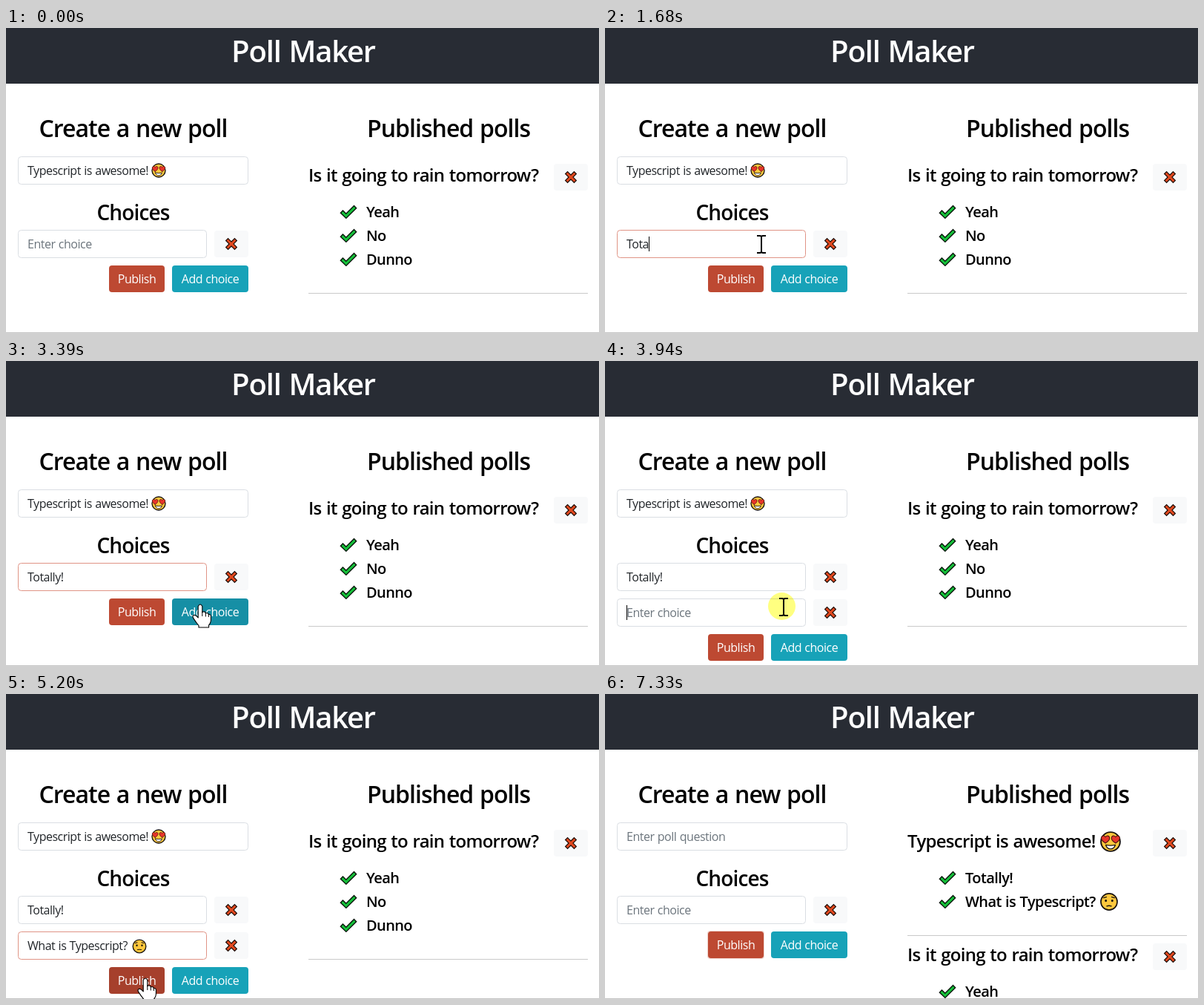
Animation of 800x411 px, one loop 7.37 s. Source, as an HTML page with a canvas:

```html
<!DOCTYPE html>
<html lang="en">
<head>
<meta charset="utf-8">
<title>Poll Maker</title>
<style>
  html, body { margin: 0; width: 100%; height: 100%; overflow: hidden; background: #fff; }
  canvas { display: block; }
</style>
</head>
<body>
<canvas width="800" height="411"></canvas>
<script>
const ctx = document.querySelector('canvas').getContext('2d');
const LOOP = 7370;
const ADDED = 3550, PASTED = 4500, PUBLISHED = 5735;
const KEY_TIMES = [1130, 1450, 1530, 1680, 1910, 1990, 2230, 2460];
const CLICKS = [[680, 800], [3470, 3630], [3870, 4020], [5660, 5735]];

// The pointer is redrawn in bursts: start, end, number of steps.
const BURSTS = [
  [130, 840, 10], [3010, 3240, 4], [3390, 3710, 5], [3870, 4090, 4],
  [4500, 5200, 10], [5660, 5890, 4], [6210, 6360, 3]
];
// Pointer positions: time, x, y.
const PATH = [
  [130, 392, 362], [610, 211, 291], [2935, 211, 291], [3240, 262, 319],
  [3390, 262, 328], [3550, 262, 328], [3710, 241, 331], [4500, 241, 331],
  [5200, 188, 383], [6135, 188, 383], [6210, 240, 390], [6285, 292, 397]
];

const between = (t, a, b) => t >= a && t < b;
const clamp = v => Math.max(0, Math.min(1, v));
const smooth = v => v * v * (3 - 2 * v);
const fade = (t, a, b) => clamp((t - a) / 150) * (1 - clamp((t - b) / 150));
const mix = (a, b, p) => `rgb(${a.map((v, i) => Math.round(v + (b[i] - v) * p))})`;

function text(str, x, y, size, { weight = 400, color = '#000', align = 'left' } = {}) {
  ctx.font = `${weight} ${size}px "Open Sans", "Noto Sans", sans-serif`;
  ctx.letterSpacing = `${-0.03 * size}px`;
  ctx.wordSpacing = `${0.04 * size}px`;
  ctx.textAlign = align;
  ctx.fillStyle = color;
  ctx.fillText(str, x, y);
  return ctx.measureText(str).width;
}

const heading = (str, x, y, size, align = 'center', color = '#000') =>
  text(str, x, y, size, { weight: 600, align, color });

function box(x, y, w, h, fill, stroke) {
  ctx.beginPath();
  const inset = stroke ? 0.5 : 0;
  ctx.roundRect(x + inset, y + inset, w - 2 * inset, h - 2 * inset, 4);
  if (fill) { ctx.fillStyle = fill; ctx.fill(); }
  if (stroke) { ctx.strokeStyle = stroke; ctx.lineWidth = 1; ctx.stroke(); }
}

// Paints a path around a local origin, fill first, then each stroke.
function shape(x, y, d, { scale = 1, fill, strokes = [], cap = 'butt' }) {
  const path = new Path2D(d);
  ctx.save();
  ctx.translate(x, y);
  ctx.scale(scale, scale);
  ctx.lineCap = cap;
  ctx.lineJoin = cap === 'round' ? 'round' : 'miter';
  if (fill) { ctx.fillStyle = fill; ctx.fill(path); }
  for (const [color, width] of strokes) {
    ctx.strokeStyle = color;
    ctx.lineWidth = width;
    ctx.stroke(path);
  }
  ctx.restore();
}

function removeButton(x, y) {
  box(x, y, 46, 36, '#f8f9fa');
  shape(x + 23, y + 18, 'M-4.4-4.4L4.4 4.4M4.4-4.4L-4.4 4.4',
    { strokes: [['#1a0d08', 5.4], ['#e2491f', 3]], cap: 'square' });
}

function check(x, y) {
  shape(x, y, 'M-7.5 1.2L-3.2 5.3L7.5-5.3',
    { strokes: [['#08140a', 5.8], ['#16c03a', 3]], cap: 'square' });
}

function emoji(x, y, r, mood) {
  const scale = r / 10;
  const draw = (d, fill, width = 1, color = '#1b1510') =>
    shape(x, y, d, { scale, fill, strokes: [[color, width]], cap: 'round' });
  draw('M-9.2 0A9.2 9.2 0 1 1 9.2 0A9.2 9.2 0 1 1-9.2 0Z', '#ffc83d', 1.4);
  if (mood === 'love') {
    for (const side of [-4.9, 4.9]) {
      const heart = `M${side} 1.4C${side - 7}-2.6 ${side - 3.2}-8 ${side}-4.6C${side + 3.2}-8 ${side + 7}-2.6 ${side} 1.4Z`;
      draw(heart, '#e8352a', 0.8, '#4a1510');
    }
    draw('M-4.6 3.2Q0 4.2 4.6 3.2Q3.4 7 0 7Q-3.4 7-4.6 3.2Z', '#fff', 0.9);
  } else {
    draw('M-3.6-1.4V-1M3.6-1.4V-1', null, 2.4);
    draw('M-6-4.4L-3-5.4M6-4.4L3-5.4M-2.6 4.8Q0 3.9 2.6 4.8', null, 1.1);
  }
}

function field(y, w, value, placeholder, focus = 0) {
  box(16, y, w, 38, '#fff', mix([218, 222, 227], [224, 148, 134], focus));
  return 29 + (value
    ? text(value, 29, y + 25, 16, { color: '#212529' })
    : (text(placeholder, 29, y + 25, 16, { color: '#6c757d' }), 0));
}

function caret(x, y) {
  ctx.fillStyle = '#000';
  ctx.fillRect(Math.round(x), y + 9, 1, 20);
}

function button(label, x, y, w, color) {
  box(x, y, w, 36, color);
  text(label, x + w / 2, y + 24, 16, { color: '#fff', align: 'center' });
}

// Draws one published poll and returns the top of the next.
function poll(top, question, choices, extras) {
  heading(question, 408, top + 24, 24, 'left');
  removeButton(739, top);
  choices.forEach((choice, i) => {
    check(462, top + 65 + 32 * i);
    heading(choice, 486, top + 72 + 32 * i, 20, 'left');
  });
  if (extras) extras();
  const end = top + 78 + 32 * choices.length;
  ctx.fillStyle = '#c9c9c9';
  ctx.fillRect(408, end, 377, 1);
  return end + 11;
}

function pointerAt(t) {
  if (t < 130 || t >= 6360) return null;
  const [start, end, steps] = BURSTS.findLast(burst => t >= burst[0]);
  const gap = (end - start) / (steps - 1);
  const time = start + gap * Math.min(steps - 1, Math.floor((t - start) / gap + 1e-6));
  const i = PATH.findLastIndex(stop => time >= stop[0]);
  const [t0, x0, y0] = PATH[i];
  const [t1, x1, y1] = PATH[i + 1] || [t0 + 1, x0, y0];
  const p = smooth(clamp((time - t0) / (t1 - t0)));
  return { x: x0 + (x1 - x0) * p, y: y0 + (y1 - y0) * p };
}

function targetUnder(pointer, rows, buttonTop) {
  if (!pointer) return null;
  const { x, y } = pointer;
  const inside = (l, t, w, h) => x >= l && x <= l + w && y >= t && y <= t + h;
  if (inside(139, buttonTop, 75, 36)) return 'publish';
  if (inside(224, buttonTop, 103, 36)) return 'add';
  for (let i = 0; i < rows; i++) {
    if (inside(16, 272 + 48 * i, 255, 38)) return 'field';
    if (inside(281, 273 + 48 * i, 46, 36)) return 'remove';
  }
  return null;
}

function drawPointer({ x, y }, target) {
  if (target === 'field') {
    shape(x, y, 'M-6-11H-2Q0-11 0-9Q0-11 2-11H6M0-9V10M-6 12H-2Q0 12 0 10Q0 12 2 12H6',
      { strokes: [['#000', 2]] });
  } else if (target) {
    shape(x, y, 'M-2.8 2.5Q0-2.5 2.8 2.5V10.5Q6.5 8.5 7.3 12Q10.5 10.5 11.3 13.6Q14.3 13 14.4 16V22Q13.8 26 11.6 28V31H-2V28.5Q-5.5 24.5-9.4 18.4Q-11 14.8-8 14.3Q-5.5 14.5-2.8 18Z',
      { fill: '#fff', strokes: [['#000', 1.1]], cap: 'round' });
    shape(x, y, 'M2.8 10V16M7.3 12V16.5M11.3 13.6V17', { strokes: [['#000', 1]] });
  } else {
    shape(x, y, 'M0.5 1V24L6 19L9.4 27.4L13 25.8L9.6 17.8H16.5Z',
      { fill: '#fff', strokes: [['#000', 1.2]] });
  }
}

function draw(t) {
  const published = t >= PUBLISHED;
  const rows = between(t, ADDED, PUBLISHED) ? 2 : 1;
  const buttonTop = 272 + 48 * rows;
  const pointer = pointerAt(t);
  let target = targetUnder(pointer, rows, buttonTop);
  if (between(t, 5200, 6210)) target = 'publish';

  ctx.fillStyle = '#fff';
  ctx.fillRect(0, 0, 800, 411);
  ctx.fillStyle = '#282c34';
  ctx.fillRect(0, 0, 800, 75);
  heading('Poll Maker', 401, 46, 40, 'center', '#fff');
  heading('Create a new poll', 171.5, 147, 32);
  heading('Published polls', 597, 147, 32);
  heading('Choices', 171.5, 259, 28);

  field(173, 311, published ? '' : 'Typescript is awesome!', 'Enter poll question');
  if (!published) emoji(206, 192, 9.8, 'love');

  const typed = published ? '' : 'Totally!'.slice(0, KEY_TIMES.filter(k => t >= k).length);
  const firstEnd = field(272, 255, typed, 'Enter choice', fade(t, 700, 3470));
  if (between(t, 760, 3010)) caret(firstEnd, 272);
  removeButton(281, 273);

  if (rows === 2) {
    const pasted = t >= PASTED;
    field(320, 255, pasted ? 'What is Typescript?' : '', 'Enter choice', fade(t, 3945, 5660));
    if (pasted) emoji(180, 340, 9.6, 'doubt');
    if (between(t, 3870, 5030)) caret(pasted ? 191 : 29, 320);
    removeButton(281, 321);
  }

  const publishDark = target === 'publish' && t < 6070;
  const addDark = target === 'add' || between(t, 3390, 3870);
  if (t >= 7330) box(138, buttonTop - 1, 77, 38, '#f0d5cf');
  button('Publish', 139, buttonTop, 75, publishDark ? '#a6402c' : '#bd4932');
  button('Add choice', 224, buttonTop, 103, addDark ? '#168fa5' : '#17a2b8');

  let top = 183;
  if (published) {
    top = poll(top, 'Typescript is awesome!', ['Totally!', 'What is Typescript?'], () => {
      emoji(682, 199, 14, 'love');
      emoji(680, 280, 12, 'doubt');
    });
  }
  poll(top, 'Is it going to rain tomorrow?', ['Yeah', 'No', 'Dunno']);

  ctx.fillStyle = '#c4c4c4';
  ctx.fillRect(0, 410, 800, 1);

  if (!pointer) return;
  if (CLICKS.some(([a, b]) => between(t, a, b))) {
    ctx.globalCompositeOperation = 'multiply';
    ctx.fillStyle = '#ffff80';
    ctx.beginPath();
    ctx.arc(pointer.x - 2.5, pointer.y - 0.5, 18.5, 0, 2 * Math.PI);
    ctx.fill();
    ctx.globalCompositeOperation = 'source-over';
  }
  drawPointer(pointer, target);
}

function frame() {
  draw(performance.now() % LOOP);
  requestAnimationFrame(frame);
}
frame();
</script>
</body>
</html>
```
